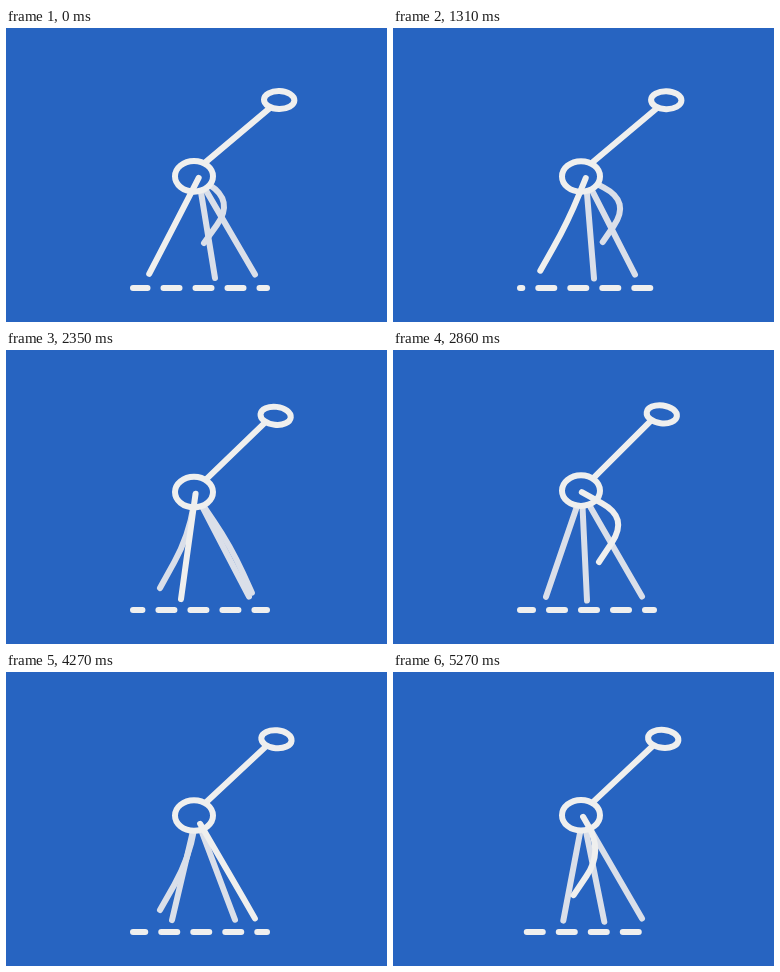
These frames come from a looping animation (381x294 px, 5.37 s). An HTML page:

```html
<!DOCTYPE html>
<html lang="en">
<head>
<meta charset="utf-8">
<title>Walker</title>
<style>
  html, body { margin: 0; width: 100%; height: 100%; overflow: hidden; background: #2764c1; }
  svg { display: block; width: 100vw; height: 100vh; }
  svg * { stroke: #efefee; stroke-width: 6; stroke-linecap: round; stroke-linejoin: round; fill: none; }
  .far { stroke: #dadfe9; }
  ellipse { fill: #2764c1; }
</style>
</head>
<body>
<svg viewBox="0 0 381 294">
  <path id="ground" d="M127 260H261" stroke-dasharray="16 16"/>
  <path class="leg far"/>
  <path class="leg far"/>
  <path class="leg far"/>
  <path id="neck"/>
  <ellipse id="head" rx="15.2" ry="9"/>
  <ellipse id="body" cx="188" rx="19" ry="15.3"/>
  <path class="leg"/>
</svg>
<script>
const LOOP = 5370, LAST_POSE = 5270, STEP = 56.95;
const STRIDE = 22.2, STANCE = 10.6;      // measured in steps
const LEG_LENGTH = 109.3, KNEE_RADIUS = 30;
const LEG_PHASES = [5, 11.3, 15.4, 0];   // the near leg comes last

// Swing: step, foot x, foot y, knee offset x, knee offset y
const SWING = [
  [10.6, 143, 246, 0, 0],
  [12.4, 154, 238, 11, -5],
  [13.4, 167, 231, 17, -5],
  [14.7, 181, 223, 25, -5],
  [15.8, 198, 215, 33, -10],
  [16.4, 206, 212, 38, -9.5],
  [18, 237, 234, 17, 0],
  [19.3, 249, 246.5, 0, 0]
];

const $ = id => document.getElementById(id);
const legs = document.querySelectorAll('.leg');
const mod = (a, n) => ((a % n) + n) % n;
const set = (el, attrs) => {
  for (const key in attrs) el.setAttribute(key, attrs[key]);
};

function slope(i, k) {
  if (i === 0 || i === SWING.length - 1) return 0;
  const a = SWING[i - 1], b = SWING[i + 1];
  return (b[k] - a[k]) / (b[0] - a[0]);
}

// Smooth Hermite curve through the swing poses
function swing(s) {
  s = Math.min(s, SWING[SWING.length - 1][0]);
  let i = 0;
  while (i < SWING.length - 2 && s > SWING[i + 1][0]) i++;
  const a = SWING[i], b = SWING[i + 1], span = b[0] - a[0];
  const u = (s - a[0]) / span, v = 1 - u;
  return [1, 2, 3, 4].map(k =>
    v * v * (1 + 2 * u) * a[k] + u * u * (3 - 2 * u) * b[k] +
    span * u * v * (v * slope(i, k) - u * slope(i + 1, k)));
}

function pose(s) {
  if (s >= STANCE) return swing(s);
  const arc = Math.sin(Math.PI * s / STANCE);
  return [249 - 10 * s, 246.5 + 4 * arc * arc, 0, 0];
}

function toward(from, to, distance) {
  const dx = to[0] - from[0], dy = to[1] - from[1];
  const length = Math.hypot(dx, dy);
  const k = Math.min(distance, length * 0.9) / length;
  return [from[0] + dx * k, from[1] + dy * k];
}

function legPath(s, hip) {
  const [x, y, bendX, bendY] = pose(s), foot = [x, y];
  const reach = Math.hypot(hip[0] - x, hip[1] - y);
  // A planted leg is too short to follow the body all the way
  const pull = Math.min(1, LEG_LENGTH / reach);
  const top = [x + (hip[0] - x) * pull, y + (hip[1] - y) * pull];
  const knee = [(top[0] + x) / 2 + bendX, (top[1] + y) / 2 + bendY];
  const before = toward(knee, top, KNEE_RADIUS);
  const after = toward(knee, foot, KNEE_RADIUS);
  return `M${top}L${before}Q${knee} ${after}L${foot}`;
}

function draw(step) {
  const bob = 4 * Math.cos(4 * Math.PI * (step - 0.5) / STRIDE);
  const y = 144.5 + bob;
  const headX = 271 + 0.57 * bob, headY = y - 76.3;
  const hip = [190.75 + 0.5 * bob, y + 1.6];

  set($('ground'), { 'stroke-dashoffset': 1.5 + 10.27 * step });
  set($('body'), { cy: y });
  set($('head'), {
    transform: `translate(${headX} ${headY}) rotate(${4.5 - 0.8 * bob})`
  });
  set($('neck'), {
    d: `M${199.5 - 0.35 * bob} ${y - 13}` +
       `L${headX - 10.5 + 0.2 * bob} ${headY + 7.6 + 0.2 * bob}`
  });
  legs.forEach((leg, i) =>
    set(leg, { d: legPath(mod(step - 33.6 + LEG_PHASES[i], STRIDE), hip) }));
}

function frame() {
  const t = performance.now() % LOOP;
  draw(t >= LAST_POSE ? 92.67 : Math.min(90, Math.floor(t / STEP + 0.16)));
  requestAnimationFrame(frame);
}
frame();
</script>
</body>
</html>
```
